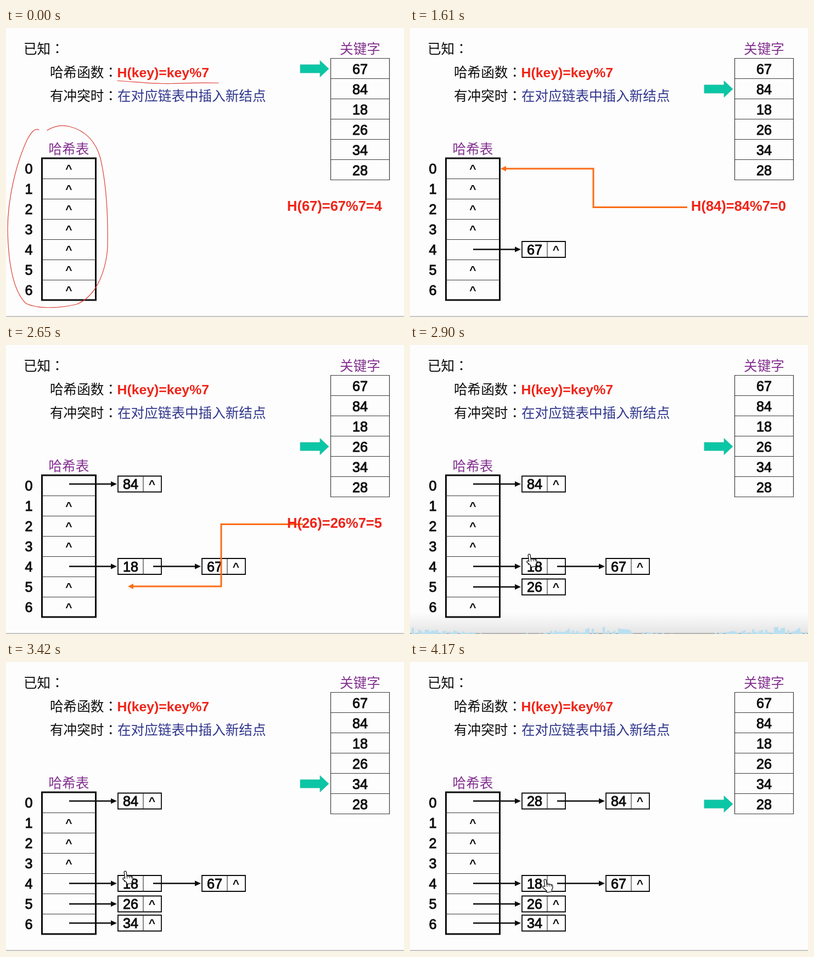
An HTML page for the animation above (4420 ms loop, 725 by 528 pixels).

```html
<!DOCTYPE html>
<html lang="zh">
<head>
<meta charset="utf-8">
<title>哈希表</title>
<style>
  html, body { margin: 0; width: 100%; height: 100%; overflow: hidden; background: #fdfdfd; }
  svg { display: block; width: 725px; height: 528px; }
  text { font: bold 25px "Liberation Sans", Arial, sans-serif; fill: #0c0c0c; }
  .num { font-weight: 400; font-size: 25.2px; text-anchor: middle; stroke: #0c0c0c; stroke-width: 1; stroke-linejoin: round; }
  .nil { font-size: 21px; text-anchor: middle; }
  .zh { font: 400 24.6px "Noto Sans CJK SC", "Noto Sans CJK", sans-serif; }
  .colon { font-family: "Noto Sans CJK TC", "Noto Sans CJK", sans-serif; }
  .mid { text-anchor: middle; }
  .purple { fill: #83308f; }
  .navy { fill: #2f358c; }
  .red { fill: #f02317; font-size: 24.8px; }
  .sum { font-size: 25.5px; }
  .line { fill: none; stroke: #0c0c0c; }
  .thin { fill: none; stroke: #3a3a3a; stroke-width: 1.2; }
  .route { fill: none; stroke: #fb6d17; stroke-width: 3; }
  .pen { fill: none; stroke: #dd4239; stroke-width: 1.2; stroke-linecap: round; }
</style>
</head>
<body>
<svg viewBox="0 0 725 528">
  <defs>
    <linearGradient id="shade" x2="0" y2="1">
      <stop stop-opacity="0"/>
      <stop offset="1" stop-opacity=".1"/>
    </linearGradient>
  </defs>
  <path d="M0 527H725" stroke="#b4b4b4" stroke-width="1.5"/>
  <text class="zh" x="32" y="46.500">已知<tspan class="colon" lang="zh-TW">：</tspan></text>
  <text class="zh" x="80" y="90">哈希函数<tspan class="colon" lang="zh-TW">：</tspan></text>
  <text class="red" x="202.500" y="89.500">H(key)=key%7</text>
  <text class="zh" x="80" y="133">有冲突时<tspan class="colon" lang="zh-TW">：</tspan></text>
  <text class="zh navy" x="203" y="133">在对应链表中插入新结点</text>
  <text class="zh mid purple" x="645" y="47">关键字</text>
  <text class="zh mid purple" x="114.500" y="230">哈希表</text>
  <g id="tables"></g>
  <g id="scene"></g>
</svg>
<script>
const LOOP = 4420, ROW = 37;
const keys = [67, 84, 18, 26, 34, 28];
const slots = [0, 1, 2, 3, 4, 5, 6];
const nodeY = { 0: 254, 4: 404.5, 5: 442, 6: 477 };

// start time, current key, keys stored so far, extras
const steps = [
  [0, 0, 0, { pen: true }],
  [70, 0, 0, { pen: true, elbow: 334 }],
  [320, 0, 1, { button: true }],
  [1610, 1, 1, { elbow: 334 }],
  [1860, 1, 2, {}],
  [2110, 2, 2, { elbow: 334 }],
  [2360, 2, 3, { button: true }],
  [2650, 3, 3, { elbow: 392, start: 541, tip: 222 }],
  [2900, 3, 4, { bars: true, hand: [217, 383] }],
  [3170, 4, 4, { elbow: 334, bars: true, hand: [217, 383] }],
  [3420, 4, 5, { hand: [217, 383] }],
  [3670, 5, 5, { elbow: 180, slide: 37.5, hand: [217, 383] }],
  [3920, 5, 6, { hand: [217, 383] }],
  [4170, 5, 6, { hand: [246, 398] }]
];

const text = (x, y, s, cls = "num") => `<text class="${cls}" x="${x}" y="${y}">${s}</text>`;
const path = (d, attrs) => `<path d="${d}" ${attrs}/>`;
const line = (d, width) => path(d, `class="line" stroke-width="${width}"`);
const thin = d => path(d, 'class="thin"');

function tables() {
  let out = thin("M591.500 55.500H698.500V277.500H591.500Z") + line("M65.500 238H163.500V497H65.500Z", 3);
  keys.forEach((key, i) => {
    out += text(645, 83.5 + ROW * i, key);
    if (i) out += thin(`M591.500 ${55.5 + ROW * i}H698.500`);
  });
  slots.forEach(i => {
    out += text(41.5, 266 + ROW * i, i);
    if (i) out += thin(`M66 ${238.5 + ROW * i}H163`);
  });
  return out;
}

function node(x, y, key, last) {
  return line(`M${x - 89} ${y}H${x - 10}`, 2.6) +
    path(`M${x - 2} ${y}l-11 -5v10z`, 'fill="#0c0c0c"') +
    line(`M${x} ${y - 14.5}h79v29h-79z`, 1.8) + thin(`M${x + 46} ${y - 14}v28`) +
    text(x + 23, y + 9, key) + (last ? text(x + 62, y + 7, "^", "nil") : "");
}

function chains(count, slide = 0) {
  const lists = slots.map(() => []);
  keys.slice(0, count).forEach(key => lists[key % 7].unshift(key));
  return lists.map((list, i) => list.length
    ? list.map((key, j) =>
        node(204 + 153 * j + (i ? 0 : slide), nodeY[i], key, j === list.length - 1)).join("")
    : text(114.5, 264 + ROW * i, "^", "nil")).join("");
}

const pointer = i =>
  path(`M536 ${67 + ROW * i}h36v-7.500l16 15 -16 15v-7.500h-36z`, 'fill="#0bc6a5" stroke="#35bda6" stroke-width=".8"');

function route(slot, { elbow, start = 505, tip = 165 }) {
  const y = 257 + 36.8 * slot;
  return path(`M${start} 327.500H${elbow}V${y}H${tip + 8}`, 'class="route"') +
    path(`M${tip} ${y}l10 -5v10z`, 'fill="#fb6d17"');
}

const pen = () =>
  path("M60 186C52 182 46 191 39 203C17 250 3 315 3 368C4 428 13 480 36 503C56 513 92 513 128 505" +
    "C162 492 181 450 185 402C186 350 184 290 172 238C163 205 142 187 116 180C100 176 86 180 75 187", 'class="pen"') +
  path("M203 96.500C235 98 260 102 300 101.500S350 99 387 100.500", 'class="pen" stroke-width="1.8"');

const button = () =>
  '<rect x="679" y="181" width="52" height="51" rx="8" fill="#97979b" fill-opacity=".86"/>' +
  [[15, "#adadb0"], [12.5, "#c4c4c6"], [10, "#e9e9ea"]]
    .map(([r, fill]) => `<circle cx="704" cy="207" r="${r}" fill="${fill}"/>`).join("");

const hand = ([x, y]) =>
  `<g transform="translate(${x} ${y}) rotate(-8)">` +
  path("M-2 1C-2 -1.500 2 -1.500 2 1V9Q4 7 6 9.500Q8 8 9.500 10.500Q12 9.500 12 13V16L9.500 20V23H0V20L-6 13Q-6 9.500 -2 12Z",
    'fill="#fff" stroke="#111" stroke-width="1.3" stroke-linejoin="round"') +
  line("M2 9v4M6 10v3M9.500 11v3", 1) + "</g>";

function bars() {
  let seed = 7, d = "";
  const random = () => (seed = seed * 16807 % 2147483647) / 2147483647;
  for (let x = 1; x < 725; x += 4) {
    const swell = 0.5 + 0.5 * Math.cos(2 * Math.PI * x / 340);
    const height = 13 * swell * random() ** 1.5;
    if (height > 1) d += `M${x} 528v${-height.toFixed(1)}`;
  }
  return '<rect y="488" width="725" height="40" fill="url(#shade)"/>' +
    path(d, 'stroke="#b9dff0" stroke-width="4"');
}

function scene([, current, stored, extra]) {
  const key = keys[current], pending = stored <= current;
  return (extra.bars ? bars() : "") + chains(stored, extra.slide) + pointer(current) +
    (extra.elbow ? route(key % 7, extra) : "") +
    (pending ? text(512, 333.5, `H(${key})=${key}%7=${key % 7}`, "red sum") : "") +
    (extra.pen ? pen() : "") + (extra.button ? button() : "") +
    (extra.hand ? hand(extra.hand) : "");
}

document.getElementById("tables").innerHTML = tables();
const stage = document.getElementById("scene");
const begin = performance.now();
let shown = null;

function draw(now) {
  const time = Math.max(0, now - begin) % LOOP;
  const step = steps.filter(([start]) => start <= time).pop();
  if (step !== shown) stage.innerHTML = scene(shown = step);
  requestAnimationFrame(draw);
}
draw(begin);
</script>
</body>
</html>
```
